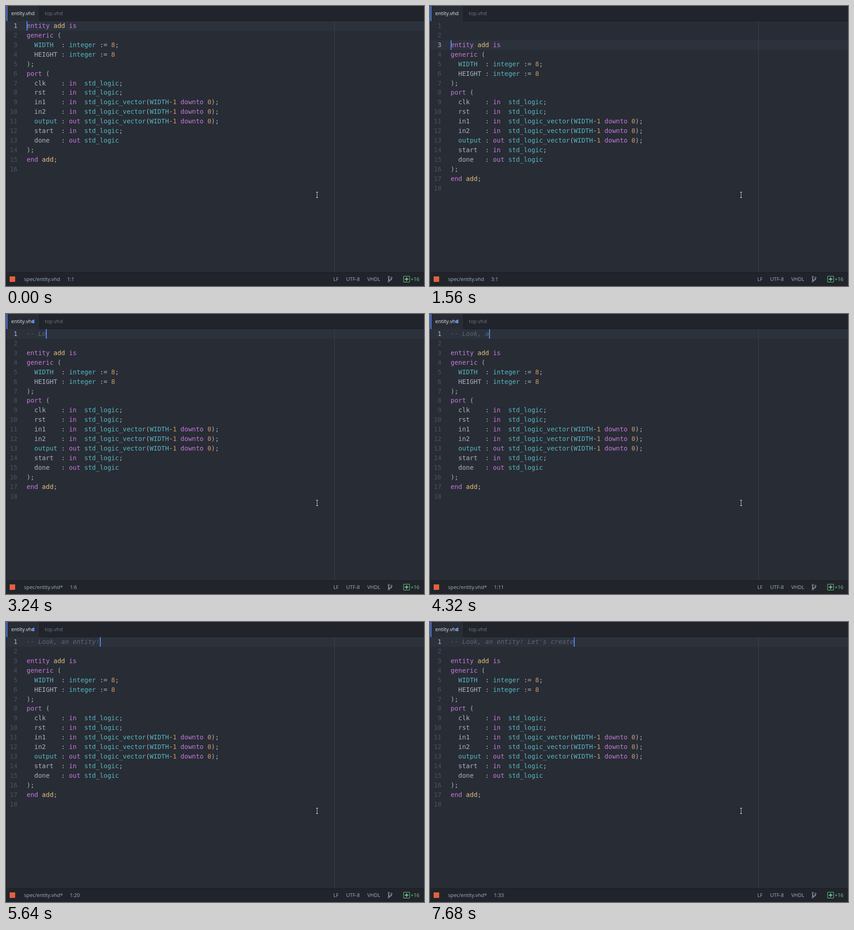
Write an HTML page that moves like this. It is 913 px wide and 613 px high and loops after 8000 ms.

```html
<!DOCTYPE html>
<html lang="en">
<head>
<meta charset="utf-8">
<title>Editor</title>
<style>
html, body { margin: 0; width: 100%; height: 100%; overflow: hidden; background: #282c34; }
svg { display: block; }
text { white-space: pre; }
.code { font: 14px "DejaVu Sans Mono", monospace; letter-spacing: -.028px; fill: #abb2bf; }
.ui { font: 11px "Noto Sans", sans-serif; fill: #9da5b4; }
.key { fill: #c678dd; }
.type { fill: #56b6c2; }
.name { fill: #e5c07b; }
.num { fill: #d19a66; }
.comment { fill: #5c6370; font-style: italic; }
.gutter { fill: #495162; text-anchor: end; }
.gutter .current { fill: #abb2bf; }
</style>
</head>
<body>
<svg width="913" height="613" viewBox="0 0 913 613">
  <rect width="913" height="613" fill="#282c34"/>
  <rect id="row" width="913" height="21" fill="#2c323c"/>
  <rect x="717" y="33" width="1" height="550" fill="#3b4049"/>
  <g id="numbers" class="code gutter"></g>
  <g id="code" class="code"></g>
  <text id="note" class="code comment" x="45" y="48"></text>
  <rect id="caret" width="2" height="21" fill="#528bff"/>

  <rect x="73" width="840" height="33" fill="#21252b"/>
  <path d="M73.5 0V32.5H913" fill="none" stroke="#181a1f"/>
  <rect width="1" height="613" fill="#181a1f"/>
  <rect x="1" width="2" height="33" fill="#528bff"/>
  <g class="ui">
    <text x="11.5" y="20" style="fill:#d7dae0">entity.vhd</text>
    <text x="84.7" y="20" style="fill:#6b717d">top.vhd</text>
  </g>
  <circle id="dot" cx="59" cy="16" r="3" fill="#528bff"/>

  <rect y="583" width="913" height="30" fill="#21252b"/>
  <rect y="583" width="913" height="1" fill="#181a1f"/>
  <rect x="8" y="592" width="12" height="12" fill="#e5603f"/>
  <g class="ui">
    <text id="file" x="39.6" y="602"></text>
    <text id="pos" y="602"></text>
    <text x="715" y="602">LF</text>
    <text x="743" y="602">UTF-8</text>
    <text x="789" y="602">VHDL</text>
    <text x="903" y="602" text-anchor="end" style="fill:#73c990">+16</text>
  </g>
  <g fill="none" stroke="#9da5b4">
    <path d="M836 594.5V601.5M842 596.5Q842 600 838.5 600.3Q836.5 600.5 836 601.5" stroke-width="1.8"/>
    <circle cx="836" cy="593" r="1.6" stroke-width=".9"/>
    <circle cx="842" cy="595" r="1.6" stroke-width=".9"/>
    <circle cx="836" cy="603" r="1.6" stroke-width=".9"/>
  </g>
  <g fill="none" stroke="#73c990">
    <rect x="868.5" y="591.5" width="13" height="13" rx=".5"/>
    <path d="M875 594V602M871 598H879" stroke-width="2"/>
  </g>

  <g fill="none">
    <path d="M676.5 407.5H682.5M679.5 407V420M676.5 419.5H682.5" stroke="#16181c" stroke-width="3"/>
    <path d="M677 407.5H682M679.5 407V420M677 419.5H682" stroke="#f2f2f2"/>
  </g>
</svg>
<script>
const LOOP = 8000, TOP = 33, LEFT = 45, ROW = 20.92, CHAR = 8.4;
const NOTE = "-- Look, an entity! Let's create";
const SOURCE = `entity add is
generic (
  WIDTH  : integer := 8;
  HEIGHT : integer := 8
);
port (
  clk    : in  std_logic;
  rst    : in  std_logic;
  in1    : in  std_logic_vector(WIDTH-1 downto 0);
  in2    : in  std_logic_vector(WIDTH-1 downto 0);
  output : out std_logic_vector(WIDTH-1 downto 0);
  start  : in  std_logic;
  done   : out std_logic
);
end add;`;

const TOKENS = [
  ["key", /^(entity|is|generic|port|in|out|downto|end)$/],
  ["type", /^(WIDTH|integer|std_logic|std_logic_vector|output)$/],
  ["name", /^add$/],
  ["num", /^\d+$/],
];

// [start time, characters typed]
const TYPING = [
  [2640, 2], [2760, 3], [3000, 4], [3240, 5], [3480, 6], [3720, 7], [4080, 9],
  [4320, 10], [4560, 11], [4800, 13], [4920, 14], [5040, 16], [5160, 17],
  [5280, 18], [5520, 19], [6120, 20], [6240, 21], [6360, 22], [6480, 23],
  [6600, 25], [6720, 26], [7080, 27], [7320, 28], [7440, 29], [7560, 31], [7680, 32],
];
// Spans in which the caret is blinked off
const BLINKS = [[240, 720], [960, 1320], [2400, 2640], [6000, 6120]];

const $ = id => document.getElementById(id);
const set = (id, attrs) => {
  for (const key in attrs) $(id).setAttribute(key, attrs[key]);
};
const rowTop = line => Math.round(TOP + ROW * (line - 1));
const baseline = line => rowTop(line) + 15;

function colour(text) {
  return text.replace(/\w+/g, word => {
    const token = TOKENS.find(([, test]) => test.test(word));
    return token ? `<tspan class="${token[0]}">${word}</tspan>` : word;
  });
}

$("code").innerHTML = SOURCE.split("\n")
  .map(text => `<text x="${LEFT}">${colour(text)}</text>`).join("");
$("numbers").innerHTML = Array.from({ length: 18 },
  (_, i) => `<text x="25" y="${baseline(i + 1)}">${i + 1}</text>`).join("");
const lines = [...$("code").children];
const numbers = [...$("numbers").children];

function draw(t) {
  const added = t >= 1560 ? 2 : 0;
  const modified = t >= 1920;
  const line = !added ? 1 : t < 1920 ? 3 : t < 2040 ? 2 : 1;
  const typed = TYPING.reduce((n, [at, count]) => t >= at ? count : n, 0);
  const hidden = BLINKS.some(([from, to]) => t >= from && t < to);
  const y = rowTop(line);

  set("row", { y });
  set("caret", { x: Math.round(LEFT + CHAR * typed), y, opacity: hidden ? 0 : 1 });
  set("dot", { opacity: modified ? 1 : 0 });
  set("pos", { x: modified ? 139.4 : 133.4 });
  $("note").textContent = NOTE.slice(0, typed);
  $("file").textContent = "spec/entity.vhd" + (modified ? "*" : "");
  $("pos").textContent = `${line}:${typed + 1}`;
  lines.forEach((el, i) => el.setAttribute("y", baseline(i + 1 + added)));
  numbers.forEach((el, i) => {
    el.setAttribute("class", i + 1 === line ? "current" : "");
    el.setAttribute("opacity", i < 16 + added ? 1 : 0);
  });
}

const began = performance.now();
function tick() {
  draw((performance.now() - began) % LOOP);
  requestAnimationFrame(tick);
}
tick();
</script>
</body>
</html>
```
